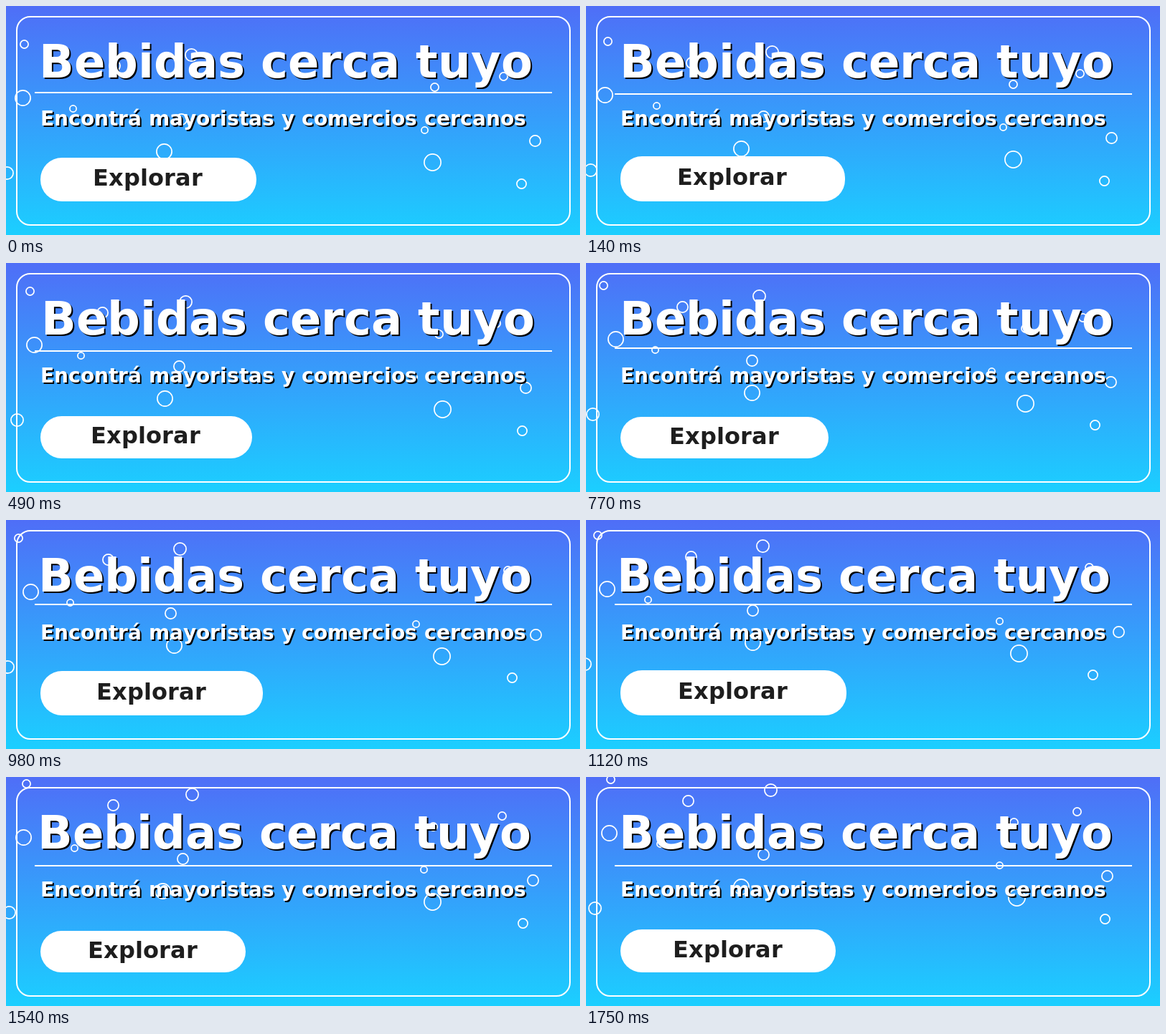
An HTML page with a canvas for the animation above (1820 ms loop, 800 by 320 pixels).

```html
<!DOCTYPE html>
<html lang="es">
<head>
<meta charset="utf-8">
<title>Bebidas cerca tuyo</title>
<style>
  html, body { margin: 0; width: 100%; height: 100%; overflow: hidden; }
  canvas { display: block; }
</style>
</head>
<body>
<canvas id="stage" width="800" height="320"></canvas>
<script>
const ctx = document.getElementById('stage').getContext('2d');
const STEP_MS = 70;
const STEPS = 26;

// Bubbles sit 15px apart vertically: [centre x, radius]
const bubbles = [
  [25, 6], [250, 9], [142, 8], [692, 6], [604, 6], [32, 11], [95, 5],
  [238, 8], [574, 5], [733, 8], [225, 11], [603, 12], [6, 9], [714, 7]
];

const sky = ctx.createLinearGradient(0, 0, 0, 320);
sky.addColorStop(0, 'rgb(79,110,247)');
sky.addColorStop(1, 'rgb(27,207,255)');

// Whole-pixel sway
const sway = (amp, angle) => Math.trunc(amp * Math.sin(angle));

function setFont(size) {
  ctx.font = `bold ${size}px "DejaVu Sans", sans-serif`;
}

// Text is set on whole-pixel advances
const advance = ch => Math.round(ctx.measureText(ch).width);
const textWidth = text => [...text].reduce((sum, ch) => sum + advance(ch), 0);

function drawText(text, x, y, color) {
  ctx.fillStyle = color;
  for (const ch of text) {
    ctx.fillText(ch, x, y);
    x += advance(ch);
  }
}

function drawShadowed(text, x, y, size) {
  setFont(size);
  drawText(text, x + 2, y + 2, '#000');
  drawText(text, x, y, '#fff');
}

function roundRect(x, y, w, h, r) {
  ctx.beginPath();
  ctx.roundRect(x, y, w, h, r);
}

function drawBubbles(step) {
  ctx.lineWidth = 1.7;
  bubbles.forEach(([x, r], i) => {
    const cx = x + sway(10, step * 0.3 + i);
    const cy = 53 + 15 * i - 2 * step;
    ctx.beginPath();
    ctx.arc(cx + 0.5, cy + 0.5, r - 0.4, 0, Math.PI * 2);
    ctx.stroke();
  });
}

function drawCard() {
  ctx.lineWidth = 2;
  roundRect(15, 15, 771, 291, 19);
  ctx.stroke();
}

function drawButton(step) {
  const label = 'Explorar';
  const scale = 1 + 0.05 * Math.sin(step / 2);
  const w = Math.trunc(300 * scale);
  const h = Math.trunc(60 * scale);
  ctx.fillStyle = '#fff';
  roundRect(48, 272 - h, w + 1, h + 1, Math.min(30, (h + 1) / 2));
  ctx.fill();
  setFont(32);
  const x = Math.floor(48 + (w - textWidth(label)) / 2);
  drawText(label, x, 251 + Math.round((60 - h) / 2), '#1e1e1e');
}

function draw(step) {
  ctx.fillStyle = sky;
  ctx.fillRect(0, 0, 800, 320);

  ctx.strokeStyle = '#fff';
  drawBubbles(step);
  drawCard();

  ctx.fillStyle = '#fff';
  ctx.fillRect(40, 120 + sway(4, step / 3), 721, 2);

  drawShadowed('Bebidas cerca tuyo', 46 + sway(4, step / 4), 100, 64);
  drawShadowed('Encontrá mayoristas y comercios cercanos', 48, 167, 28);
  drawButton(step);
}

const start = performance.now();
function tick() {
  const elapsed = performance.now() - start;
  draw(Math.floor(elapsed / STEP_MS) % STEPS);
  requestAnimationFrame(tick);
}
tick();
</script>
</body>
</html>
```
